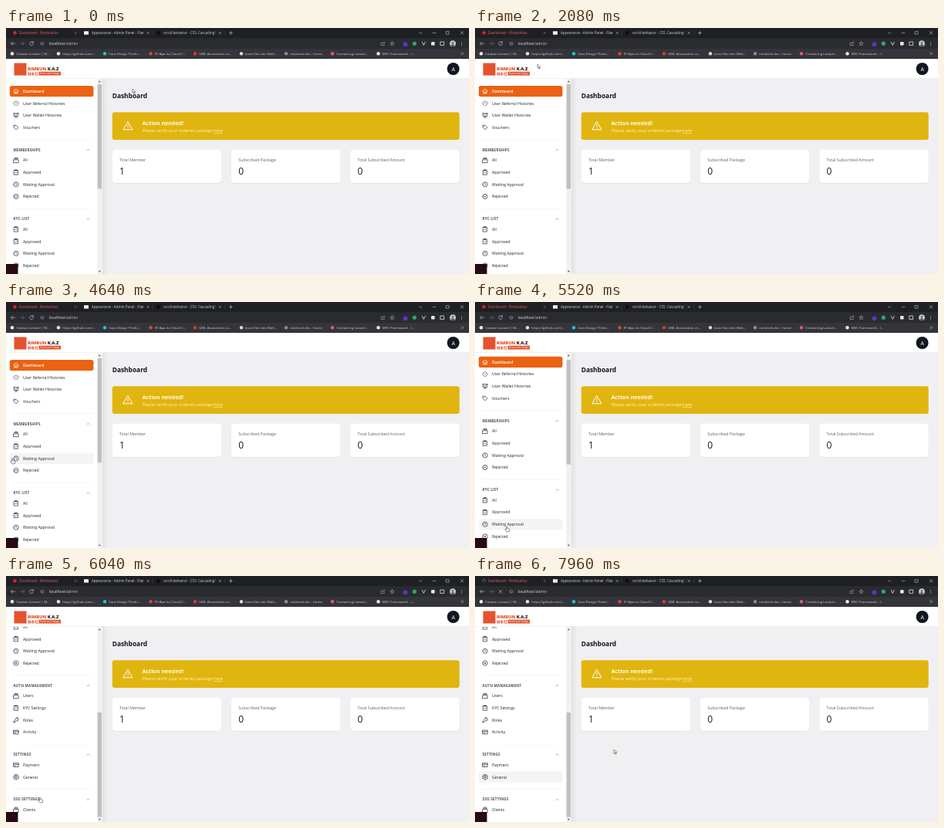
Animation of 600x319 px, one loop 8 s. Source, as an HTML page:

```html
<!DOCTYPE html>
<html lang="en">
<head>
<meta charset="utf-8">
<title>Dashboard</title>
<style>
html, body { margin: 0; width: 100%; height: 100%; overflow: hidden; background: #f0f0f3; }
svg { display: block; width: 100%; height: 100%; }
text { font-family: "Open Sans", "Noto Sans", sans-serif; white-space: pre; }
.cjk { font-family: "Noto Sans CJK SC", "Noto Sans CJK", sans-serif; }
.line { fill: none; stroke-linecap: round; stroke-linejoin: round; }
</style>
</head>
<body>
<svg id="stage" viewBox="0 0 600 319" preserveAspectRatio="none"></svg>
<script>
const LOOP = 8000, LOAD_AT = 7250, SCROLL = 195, ROW = 15.65;
const INK = '#20242c', ORANGE = '#ea6212', LIGHT = '#cfd1d5', RED = '#e0606a', BRAND = '#e5532d';

const rect = (x, y, w, h, fill, r = 0, extra = '') =>
  `<rect x="${x}" y="${y}" width="${w}" height="${h}" rx="${r}" fill="${fill}" ${extra}/>`;
const disc = (x, y, r, fill) => `<circle cx="${x}" cy="${y}" r="${r}" fill="${fill}"/>`;
const text = (x, y, size, fill, str, weight = 400, extra = '') =>
  `<text x="${x}" y="${y}" font-size="${size}" fill="${fill}" font-weight="${weight}" ${extra}>${str}</text>`;
const line = (d, color, width = 0.6, extra = '') =>
  `<path class="line" d="${d}" stroke="${color}" stroke-width="${width}" ${extra}/>`;
const cross = (x, y, r, color, w = 0.6) =>
  line(`M${x - r} ${y - r}l${2 * r} ${2 * r}m0 ${-2 * r}l${-2 * r} ${2 * r}`, color, w);
const ring = (x, y, r) =>
  `M${x - r} ${y}a${r} ${r} 0 1 0 ${2 * r} 0a${r} ${r} 0 1 0 ${-2 * r} 0`;

// menu icons on a 24 unit grid
const ICONS = {
  home: 'M3 11 12 3l9 8M5.5 9v11h13V9M10 20v-6h4v6',
  dots: [[12, 4], [6, 7], [18, 7], [12, 12], [6, 17], [18, 17], [12, 20], [3, 12], [21, 12]]
    .map(([x, y]) => ring(x, y, 0.6)).join(''),
  board: 'M3 4h18M4 4v11h16V4M12 15v3M8 21l4-3 4 3M8 11l3-3 2 2 3-3',
  tag: 'M4 4h8l8.5 8.5-8 8L4 12zM8 8h.1',
  stack: 'M3 10h18v11H3zM5 6h14M7 2.5h10',
  check: 'M5 4h14v17H5zM9 2.5h6v3H9zM9 13l2 2 4-4',
  clock: ring(12, 12, 9) + 'M12 7v5l3 3',
  reject: ring(12, 12, 9) + 'M9.5 9.5l5 5m0-5l-5 5',
  key: 'M15 3a6 6 0 1 1-2 11.6L10 17H8v2H6v2H3v-4l6.4-6.4A6 6 0 0 1 15 3zM16 8h.1',
  card: 'M3 5h18v14H3zM3 10h18M7 15h3',
  cog: 'M12 2l2 3 4-1 0 4 4 2-2 3 1 4-4 1-2 4-3-2-3 2-2-4-4-1 1-4-2-3 4-2 0-4 4 1z' + ring(12, 12, 3)
};

const review = [['All', 'stack'], ['Approved', 'check'], ['Waiting Approval', 'clock'], ['Rejected', 'reject']];
const kyc = [['All', 'check'], ...review.slice(1)];
const GROUPS = [
  ['', 68.5, [['Dashboard', 'home'], ['User Referral Histories', 'dots'],
    ['User Wallet Histories', 'board'], ['Vouchers', 'tag']]],
  ['MEMBERSHIPS', 158, review],
  ['KYC LIST', 247.5, kyc],
  ['AUTH MANAGEMENT', 337, [['Users', 'stack'], ['KYC Settings', 'check'], ['Roles', 'key'], ['Activity', 'card']]],
  ['SETTINGS', 426.5, [['Payment', 'card'], ['General', 'cog']]],
  ['SSO SETTINGS', 484.8, [['Clients', 'stack']]]
];

const items = [];
function menuItem([label, icon], y) {
  const active = label === 'Dashboard', color = active ? '#fff' : INK;
  items.push({ label, y, active });
  return rect(4.8, y - 7.1, 108.6, 14.2, active ? ORANGE : '#f4f4f5', 2.8, 'class="row"') +
    line(ICONS[icon], color, 2, `transform="translate(8.9 ${y - 4.1}) scale(.345)"`) +
    text(22, y + 1.85, 5.2, color, label, active ? 600 : 500);
}
function menuGroup([title, y, list]) {
  const head = title &&
    line(`M9.5 ${y - 13.5}H113`, '#ececee', 0.5) +
    text(9.5, y + 1.6, 4.6, '#4b4f58', title, 700, 'letter-spacing=".2"') +
    line(`M104.9 ${y + 0.8}l1.6-1.6 1.6 1.6`, '#777');
  return head + list.map((it, i) => menuItem(it, y + 13.5 + i * ROW)).join('');
}

const card = (x, label, value) =>
  rect(x, 158.4, 141.3, 43.3, '#dedee3', 4.2) + rect(x, 157.8, 141.3, 43.2, '#fff', 4.2) +
  text(x + 9.3, 173, 5.25, '#5a606b', label, 500) + text(x + 9.3, 190, 12, '#16181d', value);

function page() {
  return rect(0, 40, 600, 279, '#f0f0f3') +
    text(137.7, 91, 8.4, '#111318', 'Dashboard', 700) +
    rect(137.7, 109.3, 450, 35.7, '#e1b50f', 3) +
    line('M158 121.7l5.9 10.1h-11.8zM158 125.2v3M158 129.9v.1', '#fff', 1) +
    text(176.4, 125.5, 7.2, '#fffbe8', 'Action needed!', 700) +
    text(176.4, 135, 5.6, '#fff3c4',
      'Please verify your ordered package <tspan text-decoration="underline">here</tspan>') +
    card(137.7, 'Total Member', 1) + card(292, 'Subscribed Package', 0) +
    card(446.3, 'Total Subscribed Amount', 0);
}

function sidebar() {
  return rect(124, 65, 8, 254, 'url(#shade)') + rect(0, 65, 124.5, 254, '#fff') +
    `<g clip-path="url(#side)"><g id="menu">${GROUPS.map(menuGroup).join('')}</g></g>` +
    rect(118.3, 65.5, 6, 253.5, '#f1f1f1') +
    '<path d="M119.8 70.2l1.5-2 1.5 2zM119.8 314.7l1.5 2 1.5-2z" fill="#555"/>' +
    rect(118.6, 73, 5.4, 135.5, '#c1c1c1', 0, 'id="thumb"');
}

function header() {
  return rect(0, 40, 600, 25.5, '#fff') + rect(0, 65.3, 600, 0.5, '#e4e4e8') +
    rect(10.5, 45.5, 16, 16, BRAND) +
    text(28, 54.7, 5.7, BRAND, 'RIMBUN <tspan fill="#222">K.A.Z</tspan>', 800) +
    text(28, 61.3, 4.6, BRAND, '林本社', 700, 'class="cjk"') +
    rect(42.5, 56.6, 28.5, 4.9, BRAND) +
    text(44, 60.2, 2.9, '#fff', 'Home and Change', 500) +
    disc(579.6, 53, 8, '#11161f') +
    text(579.6, 55.5, 7, '#fff', 'A', 500, 'text-anchor="middle"');
}

const tab = (x, title, color = LIGHT) =>
  `<svg x="${x}" width="68" height="13">${text(0, 8.1, 4.5, color, title)}</svg>` +
  cross(x + 73.2, 6.4, 1.3, color, 0.5);

const BOOKMARKS = [
  [8, '#f2f2f2', 'Catatan Laravel | M...'], [68, '#e8e8e8', 'https://github.com/...'],
  [128, '#27c4c9', 'Cara Design Thinki...'], [187.5, '#e0443a', '(F) Apa itu Cloud C...'],
  [245, '#d83a35', 'UML Association vs...'], [305, '#d9d9d9', 'Joost Van den Bolk...'],
  [363, '#8a8d92', 'nolvbeck.dev - home'], [423, '#e2557f', 'Containing Laravel...'],
  [482.5, '#eee', 'MVC Framework - I...']
];

function browser() {
  return rect(0, 0, 600, 13.5, '#1f2023') + rect(0, 13, 600, 14, '#2a2b2f') +
    rect(0, 27, 600, 13, '#34353a') +
    `<g id="favicon">${disc(11.5, 6.3, 2.2, '#d92332')}</g>` +
    line('M13.5 6.3a2 2 0 1 1-2-2', '#8b9097', 0.6, 'id="spinner"') +
    tab(17, 'Dashboard - RimbunKaz', RED) +
    rect(101, 4.2, 6, 4.4, '#f4f4f4') + tab(111, 'Appearance - Admin Panel - Filament') +
    rect(195, 4.2, 4.4, 4.4, '#0d0d0f') + tab(204, 'scroll-behavior - CSS: Cascading Style') +
    line('M189.8 4v5M283.8 4v5', '#55575c', 0.4) +
    line('M289.4 6.4h4M291.4 4.4v4', LIGHT) +
    line('M535.5 5.7l1.7 1.6 1.7-1.6M553 6.4h4M570.5 4.6h3.5v3.5h-3.5z', LIGHT, 0.55) +
    cross(591, 6.3, 1.8, LIGHT) +
    line('M11.8 20.2H6.5m2.2-2.2l-2.2 2.2 2.2 2.2', LIGHT) +
    line('M18.5 20.2h5.3m-2.2-2.2l2.2 2.2-2.2 2.2', '#777a80') +
    `<g id="reload">${line('M35 18.7a2.4 2.4 0 1 0 .4 2.1M35.3 17.3v1.7h-1.7', LIGHT)}</g>` +
    `<g id="stop">${cross(33, 20.2, 1.9, LIGHT)}</g>` +
    line(ring(47, 20.2, 2) + 'M47 20.1v1.1', '#b9bbc0', 0.5) +
    text(55.7, 22, 5, '#e8eaed', 'localhost<tspan fill="#c2c4c8">/admin</tspan>') +
    line('M487.5 19h-1.5v3.5h4.3v-1M487.8 20.8q.4-2 2.7-2m-1-1.2l1.2 1.2-1.2 1.2', '#b9bbc0', 0.5) +
    line('M500.5 17.7l.8 1.7 1.8.2-1.4 1.2.4 1.8-1.6-.9-1.6.9.4-1.8-1.4-1.2 1.8-.2z', '#c6c8cc', 0.5) +
    disc(517.5, 21.2, 2.9, '#5b35c8') + disc(529.3, 20.2, 2.6, '#2fa866') +
    line('M539.3 18.2l2 4.2 2-4.2', '#c0c2c6', 1) +
    rect(551, 18, 4.6, 4.6, '#e4e5e8', 1) +
    line('M563.2 18h4.4v4.4h-4.4z', '#e4e5e8', 0.8) +
    disc(579, 20.2, 3.9, '#c9cbd0') + disc(579, 19.2, 1.3, '#5d6068') +
    '<path d="M576.3 22.9q2.7-4.2 5.4 0a3.9 3.9 0 0 1-5.4 0z" fill="#5d6068"/>' +
    [18.4, 20.2, 22].map(y => disc(590.5, y, 0.5, LIGHT)).join('') +
    BOOKMARKS.map(([x, color, label]) =>
      disc(x, 33.2, 2.2, color) + text(x + 5.2, 34.9, 4.35, LIGHT, label)).join('') +
    line('M589.6 31.7l1.5 1.5-1.5 1.5m2-3l1.5 1.5-1.5 1.5', LIGHT, 0.5);
}

const pointer =
  `<g id="cursor" fill="#fff" stroke="#222" stroke-width=".5" stroke-linejoin="round">
  <path id="arrow" d="M0 0v5.3l1.3-1.1.9 1.9.9-.4-.9-1.9h1.7z"/>
  <path id="hand" d="M-.6.4q.6-.8 1.2 0v2.2l2.5.6q.8.2.7 1l-.4 2.6h-3.6l-1.9-2.6q0-.9.8-.6l.7.6z"/></g>`;

const stage = document.getElementById('stage');
stage.innerHTML = `<defs>
  <clipPath id="side"><rect y="65.7" width="118" height="254"/></clipPath>
  <linearGradient id="shade"><stop stop-color="#e0e0e4"/><stop offset="1" stop-color="#f0f0f3"/></linearGradient>
  </defs>` + page() + sidebar() + header() + browser() +
  rect(0, 306, 15.5, 13, '#270a12') + pointer;

const $ = id => document.getElementById(id);
const rows = [...stage.querySelectorAll('.row')];
const show = (el, on) => el.setAttribute('visibility', on ? 'visible' : 'hidden');
const smooth = p => { p = Math.min(1, Math.max(0, p)); return p * p * (3 - 2 * p); };

// time, x, y
const PATH = [
  [0, 164, 79], [800, 156, 76], [2000, 81, 47], [2400, 81, 47], [3400, 178, 70],
  [3700, 178, 70], [4640, 8, 203], [5350, 41, 291], [5520, 41, 291], [6040, 44, 287],
  [6300, 44, 287], [6900, 36, 261], [7300, 36, 261], [7900, 180, 225], [LOOP, 180, 225]
];
function cursorAt(t) {
  const i = Math.max(1, PATH.findIndex(k => k[0] > t));
  const [t0, x0, y0] = PATH[i - 1], [t1, x1, y1] = PATH[i];
  const p = smooth((t - t0) / (t1 - t0));
  return [x0 + (x1 - x0) * p, y0 + (y1 - y0) * p];
}

function draw(t) {
  const scroll = SCROLL * smooth((t - 5480) / 480);
  const loading = t >= LOAD_AT;
  const [x, y] = cursorAt(t);
  const inMenu = x > 4.8 && x < 113.4 && y > 66;
  let link = inMenu && GROUPS.some(([title, gy]) => title && Math.abs(gy - scroll - y) < 5);

  items.forEach((it, i) => {
    const over = inMenu && Math.abs(it.y - scroll - y) < 7;
    link = link || over;
    show(rows[i], it.active || over || (loading && it.label === 'General'));
  });
  $('menu').setAttribute('transform', `translate(0 ${-scroll})`);
  $('thumb').setAttribute('y', 73 + 104 * scroll / SCROLL);
  $('cursor').setAttribute('transform', `translate(${x} ${y})`);
  show($('hand'), link);
  show($('arrow'), !link);
  show($('favicon'), !loading);
  show($('reload'), !loading);
  show($('spinner'), loading);
  show($('stop'), loading);
  $('spinner').setAttribute('transform', `rotate(${-(t - LOAD_AT) * 0.3} 11.5 6.3)`);
}

const start = performance.now();
function tick() {
  draw((performance.now() - start) % LOOP);
  requestAnimationFrame(tick);
}
tick();
</script>
</body>
</html>
```
